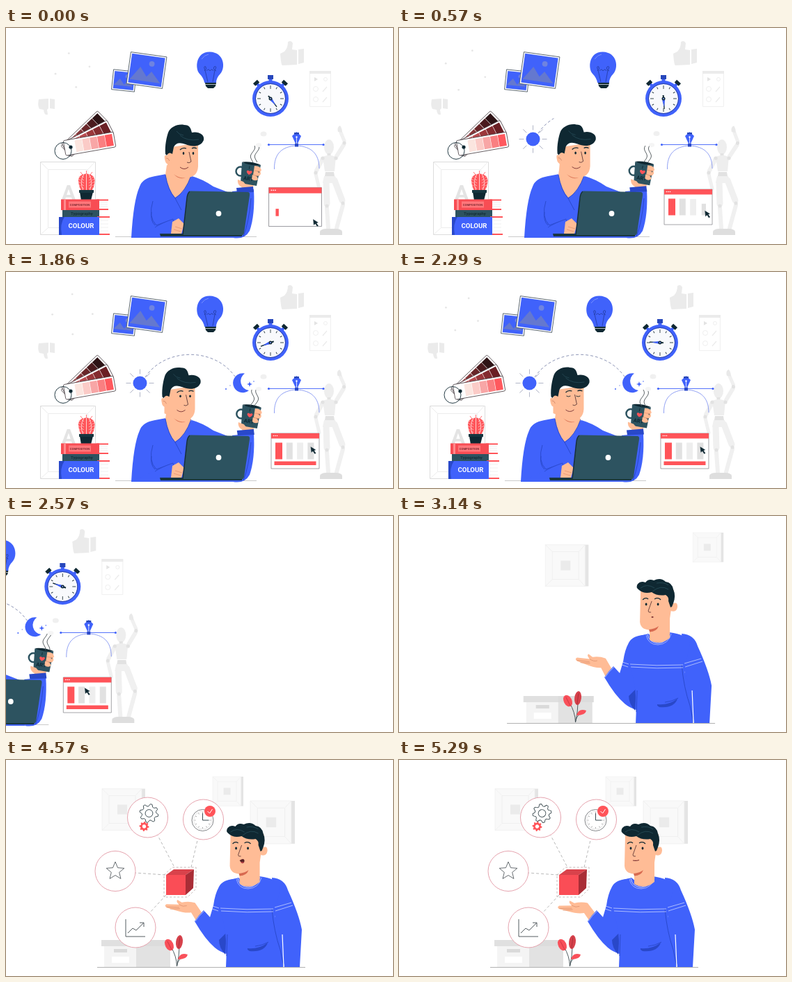
Animation of 556 by 312 pixels, one loop 5440 ms. Source, as an HTML page with a canvas:

```html
<!DOCTYPE html>
<html lang="en">
<head>
<meta charset="utf-8">
<title>Designer at work</title>
<style>
html, body { margin: 0; width: 100%; height: 100%; overflow: hidden; background: #fff; }
canvas { display: block; width: 556px; height: 312px; }
</style>
</head>
<body>
<canvas id="stage"></canvas>
<script>
const canvas = document.getElementById('stage');
const c = canvas.getContext('2d');
const ratio = window.devicePixelRatio || 1;
canvas.width = 556 * ratio;
canvas.height = 312 * ratio;

const LOOP = 5440, STEP = LOOP / 38;
const BLUE = '#4062fb', NAVY = '#2948c9', DARK = '#0f2832', TEAL = '#2d5360',
      RED = '#ff5459', SKIN = '#ffbc96', PALE = '#ebebeb', INK = '#3b4a50';
const TAU = Math.PI * 2;
const rad = deg => deg * Math.PI / 180;
const clamp = x => Math.max(0, Math.min(1, x));
const prog = (t, start, len) => clamp((t - start) / len);
const out = p => 1 - (1 - p) * (1 - p);
const mix = (a, b, p) => a + (b - a) * p;

function fill(d, color) { c.fillStyle = color; c.fill(new Path2D(d)); }
function line(d, color, w = 1) { c.strokeStyle = color; c.lineWidth = w; c.stroke(new Path2D(d)); }
function box(x, y, w, h, color) { c.fillStyle = color; c.fillRect(x, y, w, h); }
function frame(x, y, w, h, color, lw = 1) { c.strokeStyle = color; c.lineWidth = lw; c.strokeRect(x, y, w, h); }
function oval(x, y, rx, ry, color) {
  c.fillStyle = color; c.beginPath(); c.ellipse(x, y, rx, ry, 0, 0, TAU); c.fill();
}
const disc = (x, y, r, color) => oval(x, y, r, r, color);
function ring(x, y, r, color, w = 1) {
  c.strokeStyle = color; c.lineWidth = w; c.beginPath(); c.arc(x, y, r, 0, TAU); c.stroke();
}
function at(x, y, deg, scale, draw) {
  if (scale <= 0) return;
  c.save(); c.translate(x, y); c.rotate(rad(deg)); c.scale(scale, scale); draw(); c.restore();
}
const shift = (x, y, draw) => at(x, y, 0, 1, draw);
function text(s, x, y, size, color) {
  c.font = `bold ${size}px Roboto, sans-serif`;
  c.textAlign = 'center'; c.textBaseline = 'middle';
  c.fillStyle = color; c.fillText(s, x, y);
}

// ---------- desk scene ----------

function floatingSquare(t) {
  const r = 25 + 7 * Math.sin(Math.PI * clamp(t / 2290)), turn = rad(-102 + t * 0.0545);
  for (let i = 0; i < 4; i++) {
    const a = turn + i * TAU / 4;
    disc(95.5 + r * Math.cos(a), 61 + r * Math.sin(a), 1.4, '#e6e6e6');
  }
}

function thumbs() {
  fill('M394 37L400 34Q405 29 405 20Q410 17 412 22L411 31L418 32V53L397 54Q395 53 394 37Z', PALE);
  fill('M420 31L428 30V50L420 52Z', PALE);
  fill('M47 103L61 102V116L59 118L60 125Q55 127 54 118L48 117Q45 112 47 103Z', PALE);
  fill('M63 102L70 103V117L63 116Z', PALE);
}

function card() {
  frame(436.5, 62.5, 30, 51, '#ededed', 0.8);
  box(436, 62, 31, 4, PALE);
  fill('M443 71L448 74L443 77Z', '#e3e3e3');
  ring(459, 74, 2.5, PALE, 0.8);
  ring(445, 88, 3.5, PALE, 0.8);
  line('M455 92L461 85', PALE, 1.2);
  ring(445, 103, 3.5, PALE, 0.8);
  line('M455 107L461 100', PALE, 1.2);
}

function photo(x, y, deg, w, h) {
  at(x, y, deg, 1, () => {
    box(-w / 2, -h / 2, w, h, '#fff');
    frame(-w / 2, -h / 2, w, h, '#53606b', 0.9);
    box(-w / 2 + 2, -h / 2 + 2, w - 4, h - 4, BLUE);
    const b = h / 2 - 7;
    fill(`M${-w * .43} ${b}L${-w * .18} ${-h * .08}L${w * .02} ${h * .2}L${w * .14} ${h * .02}L${w * .42} ${b}Z`, '#6478cf');
    disc(w * .12, -h * .22, w * .075, '#6f83e0');
  });
}

function bulb() {
  fill('M285 79Q284 72 278 66C271 58 273 34 293 34.5C313 35 316 57 308 66Q302 72 302 79Z', BLUE);
  line('M290 78L286 61Q283 54 287 56Q289 60 285 62M297 78L300 61Q304 54 299 56Q297 60 302 62M288 62Q291 58 293 62Q296 58 298 62', '#223a9e', 0.8);
  line('M281 45Q285 39 291 38', '#7990ff', 1);
  fill('M286 79H302L301 84L298 87H290L287 84Z', DARK);
  line('M286.5 81.5H301.5', '#fff', 0.7);
}

function stopwatch(t) {
  shift(380, 102, () => {
    for (const a of [-42, 42]) at(0, 0, a, 1, () => { box(-2, -29, 4, 5, BLUE); box(-4, -33, 8, 5, DARK); });
    box(-2.5, -29, 5, 5, BLUE);
    box(-4, -34, 8, 6, '#2747bb');
    disc(0, 0, 26, BLUE);
    disc(0, 0, 21, '#f8f9fc');
    ring(0, 0, 21.5, '#263b91', 0.8);
    for (let i = 0; i < 12; i++)
      at(0, 0, i * 30, 1, () => box(-0.5, -19, 1, i % 3 ? 3 : 5, INK));
    at(0, 0, 53 + t * 0.057, 1, () => {
      fill('M-5 -1L15 -.6V.6L-5 1Z', DARK);
      fill('M2 -2L12 0L2 2Z', BLUE);
    });
    disc(0, 0, 2.5, DARK);
    disc(0, 0, 1, '#8ba0ff');
  });
}

function swatches() {
  const fans = [
    [-44, ['#a5484c', '#863638', '#692629', '#4a1a1d', '#2d1315']],
    [-27, ['#d3686b', '#b84c50', '#9c373b', '#842b2f', '#6a1f24']],
    [-10, ['#fbe5df', '#fbcbc7', '#f8a6a6', '#fa7f81', '#ff595e']]
  ];
  for (const [deg, tones] of fans) at(93, 172, deg, 1, () => {
    c.fillStyle = '#fff'; c.beginPath(); c.roundRect(-9, -11, 73, 22, 2); c.fill();
    c.strokeStyle = '#4c4348'; c.lineWidth = 0.8; c.stroke();
    tones.forEach((tone, i) => box(7 + i * 11, -8.5, 10.4, 17, tone));
  });
  disc(93, 172, 2.6, DARK);
  ring(82, 177.5, 12, DARK, 0.9);
}

function books() {
  box(49.5, 193.5, 79, 105, '#fff');
  frame(49.5, 193.5, 79, 105, '#dcdcdc');
  frame(60.5, 204.5, 57, 84, '#e8e8e8', 0.8);
  line('M49 193L60 204M128 193L118 204M49 299L60 289', '#e8e8e8', 0.8);
  text('A', 90, 240, 31, '#e4e4e4');

  fill('M104 221C103 207 128 207 127.5 221Q127 231 122 236H109Q105 231 104 221Z', RED);
  line('M115.5 210V235M112 211Q105 222 111 235M119 211Q126 222 120 235', '#fff0ed', 0.8);
  for (let y = 214; y < 234; y += 4)
    line(`M104 ${y}L107 ${y + 2}M109 ${y}L112 ${y + 2}M122 ${y}L119 ${y + 2}M127 ${y}L124 ${y + 2}`, '#ffd9d5', 0.7);
  line('M115.5 211V206M110 212L107 208M121 212L124 208', RED, 0.8);
  fill('M106 237H125L122 249H108Z', DARK);
  box(105, 234, 21, 4, '#173640');

  box(132, 248, 15, 15, '#fff');
  line('M130 248.5H147M130 262H147', RED, 1.8);
  line('M134 252H146M134 255H146M134 258H146', '#e4e4e4', 0.6);
  box(79, 247.5, 55, 15.5, '#f84d54');
  box(83, 247.5, 3, 15.5, '#ff8b8d');
  box(90, 250.5, 32, 9, '#ff777b');
  text('COMPOSITION', 106, 255.5, 4.2, '#812b33');
  box(81, 263, 53, 10, TEAL);
  text('Typography', 109, 268.3, 6, '#14303a');
  box(132, 273, 16, 25, '#fff');
  line('M131 273H149M131 298H149', RED, 1.8);
  line('M135 278H147M135 283H147M135 288H147M135 293H147', '#e7e7e7', 0.6);
  box(76, 273, 58, 26, BLUE);
  fill('M76 273H84Q77 283 80 299H76Z', NAVY);
  text('COLOUR', 108, 286.5, 9.6, '#fff');
}

function mannequin(t) {
  const limb = (d, w) => line(d, '#f0f0f0', w), joint = (x, y, r = 2.6) => disc(x, y, r, '#e2e2e2');
  c.lineCap = 'round';
  limb('M455 189L446 206', 6); limb('M445 211L450 232', 5);
  limb('M460 222L461 254', 9); limb('M461 260L463 289', 6);
  limb('M472 220L483 249', 9); limb('M484 256L475 289', 6);
  at(474, 187, Math.sin(t / 500) * 1.5, 1, () => {
    limb('M1 -2L11 -18', 6); limb('M12 -24L7 -36', 5);
    fill('M3 -37Q1 -44 6 -46Q9 -42 9 -36Z', '#e9e9e9');
    joint(12, -21);
  });
  c.lineCap = 'butt';
  oval(464, 172, 7, 11, '#eeeeee');
  box(461.5, 181, 5, 5, '#e3e3e3');
  fill('M455 186Q464 182 474 186L472 207H458Z', '#eeeeee');
  fill('M459 208H471L472 214H458Z', '#e2e2e2');
  fill('M457 214H473L476 224H455Z', '#f0f0f0');
  joint(455, 188); joint(445, 209); joint(474, 188); joint(461, 257); joint(484, 253);
  fill('M451 299V294Q453 290 460 290H474Q481 290 483 294V299Z', '#dedede');
}

function penTool() {
  line('M378 168.500H456', BLUE, 0.9);
  disc(377.5, 168.5, 1.6, BLUE); disc(456, 168.5, 1.6, BLUE);
  line('M385.5 204C385 181 397 171 417.5 170C438 171 450 181 450 203', '#7488f0', 0.8);
  fill('M417.5 150L424 156L419.5 166H415.5L411 156Z', BLUE);
  box(414, 151, 7, 2.5, '#2846b7');
  line('M417.5 158V167', '#fff', 0.8);
  disc(417.5, 157.5, 1.2, '#fff');
  box(415, 166.5, 5, 5, NAVY);
}

function browser(t) {
  const size = 1 + 0.1 * (1 - prog(t, 0, 500));
  at(415.5, 258.5, 0, size, () => {
    box(-34.5, -25.5, 69, 51, '#fff');
    frame(-34.5, -25.5, 69, 51, '#8d8d92', 0.8);
    box(-34.5, -25.5, 69, 7.5, RED);
    for (const x of [-31, -28.5, -26]) disc(x, -22, 0.8, '#fff');
    for (let i = 0; i < 4; i++) {
      const p = out(prog(t, -130 + i * 170, 430)), grow = i ? p : 0.4 + 0.6 * prog(t, 0, 380);
      const h = 24 * grow, w = (i ? 9 : 10) * grow;
      if (p) box(-23.5 + i * 15.3 - w / 2, 12 - h, w, h, i ? (i == 2 ? '#eeeeee' : '#e1e1e1') : RED);
    }
    box(-30, 15, 60 * out(prog(t, 640, 430)), 5.5, RED);
  });
  const p = prog(t, 100, 900), q = prog(t, 2290, 286);
  shift(mix(441, 437.5, p) - 26 * q, mix(276, 252, p) - 4 * q, () => {
    const arrow = 'M0 0L1 9L3.4 7L6 11L8 9.7L5.4 6L8 5Z';
    fill(arrow, DARK);
    line(arrow, '#fff', 0.3);
  });
}

function dayNight(t) {
  const sun = out(prog(t, 250, 300)), arc = prog(t, 450, 550), moon = out(prog(t, 850, 300));
  if (arc) {
    c.save();
    c.beginPath(); c.rect(190, 110, 145 * arc, 60); c.clip();
    c.setLineDash([4, 3]);
    line('M200 152C228 109 299 108 329 151', '#7f88ad', 0.9);
    c.restore();
  }
  at(192.5, 160.5, 0, sun, () => {
    disc(0, 0, 10, BLUE);
    for (let i = 0; i < 8; i++) at(0, 0, i * 45, 1, () => line('M13 0H20', '#a9aec2', 0.9));
  });
  at(338, 161, 0, moon, () => {
    fill('M5 -14.5A14 14 0 1 0 11 10A13.5 13.5 0 0 1 5 -14.5Z', BLUE);
    fill('M12 -3L13 0L16 1L13 2L12 5L11 2L8 1L11 0Z', BLUE);
    disc(-22, 8, 1, BLUE); disc(-16, 3, 0.8, '#8796e8'); disc(18, -3, 0.8, BLUE);
  });
}

function mugArm(t) {
  const p = clamp(t / 2290);
  fill('M325 236L356 233Q358 270 350 293Q343 306 326 303Z', BLUE);
  line('M352 246Q349 281 341 301', NAVY, 1);
  shift(p, -2.5 * p, () => {
    fill('M335 221L341 237L354 235L357 220L366 211L365 203L356 196L344 224Z', SKIN);
    fill('M331 231L355 229L356 237L332 238Z', NAVY);
    ring(337, 207, 6.5, TEAL, 2.5);
    fill('M339 194L366 198L360 228L337 224Z', TEAL);
    fill('M339 193.5Q352 192 366 197.5Q352 200 339 193.5Z', DARK);
    at(349, 212, 9, 1, () => {
      text('I', -1, -10, 6, '#0e2833');
      fill('M0 0C-7 -4 -3 -8 0 -5C3 -8 7 -4 0 0Z', RED);
      text('ART', 0, 6, 7.5, '#0e2833');
    });
    fill('M357 199Q366 199 367 206Q361 209 356 206Z', SKIN);
    fill('M356 206Q364 206 365 213Q359 215 355 212Z', SKIN);
    fill('M354 212Q362 213 362 219Q357 222 353 218Z', SKIN);
    fill('M333 219Q332 225 337 229L346 228L341 222Z', SKIN);
    line('M357 206L364 207M355 212L362 214', '#df8d6b', 0.6);
  });
  for (const x of [353, 359]) {
    c.beginPath();
    for (let y = 194; y >= 170; y -= 1)
      c.lineTo(x + 2.5 * Math.sin((y + t * 0.02) / 3.8) + (194 - y) * 0.1, y);
    c.strokeStyle = '#4d5559'; c.lineWidth = 0.9; c.stroke();
  }
  oval(370, 153 - 2 * p, 4.5, 3.5, '#f0f0f0');
  oval(363, 169, 4, 3, '#f5f5f5');
}

function deskHead(t) {
  const p = clamp(t / 2290), blink = t > 2250 && t < 2420;
  shift(-5.5 * p, -2 * p, () => {
    fill('M232 173L276 166L276 200Q275 216 259 216Q250 217 244 211L232 206Z', SKIN);
    fill('M238 188Q226 179 228 189Q229 199 237 196Z', SKIN);
    fill('M229 182C228 169 231 157 233 151C236 143 247 138 256 140C264 140 265 144 267 151C275 149 286 153 284 162C280 172 267 172 258 168Q245 163 241 172L239 182Q234 178 231 184Z', DARK);
    line('M250 155Q260 164 277 161M245 149Q248 154 255 155', '#274c58', 0.8);
    line('M250 176Q254 172 259 174M267 174Q270 172 274 174', DARK, 1.3);
    if (blink) line('M251 181Q254 183 257 181M265 181Q268 183 271 181', DARK, 0.9);
    else { oval(255, 181, 1.3, 1.9, DARK); oval(269, 181, 1.3, 1.9, DARK); }
    line('M263 179L266 193Q263 196 260 194', '#5b3838', 0.9);
    line('M250 201Q256 206 262 201', '#823c3b', 1);
    line('M230 188Q233 187 235 192', '#c97f62', 0.7);
  });
}

function worker(t) {
  line('M157 301.500H360', '#bdbdbd', 0.8);
  fill('M180 303Q183 249 192 229Q196 217 214 214L230 211L242 231L267 214Q282 218 298 229L326 240V303Z', BLUE);
  fill('M231 198L264 208L266 213Q257 238 243 245Q233 234 229 212Z', SKIN);
  fill('M241 211Q249 218 258 216Q249 220 241 211Z', '#dc7959');
  line('M229 212Q233 235 243 246Q258 236 266 213', NAVY, 0.9);
  line('M243 246L252 263M211 250Q204 273 216 285L240 276M209 266Q207 278 214 285', NAVY, 0.9);
  fill('M216 286L240 275L246 294L222 302H180L190 298Z', BLUE);
  line('M214 288Q223 282 240 276L244 294', NAVY, 0.8);
  mugArm(t);
  deskHead(t);
  fill('M239 280L248 275L256 283L252 297H237Z', SKIN);
  line('M243 287L253 290M241 291L251 294', '#d78666', 0.6);
  fill('M265 235.5L347 237Q351 237 350 242L342 296Q341 300 337 300H254L261 240Q262 236 265 235.5Z', TEAL);
  line('M264 236Q261 238 260 245L254 299', '#172f38', 1.5);
  fill('M221 297H254L256 301H222Z', '#183640');
  box(240, 299, 99, 2, '#183640');
  disc(305.5, 268, 3.9, '#fff');
}

function deskScene(t) {
  floatingSquare(t);
  thumbs();
  card();
  photo(169.5, 76, 6, 33, 29);
  photo(202, 61, 8, 52, 46);
  bulb();
  stopwatch(t);
  books();
  swatches();
  mannequin(t);
  penTool();
  browser(t);
  dayNight(t);
  worker(t);
}

// ---------- idea scene ----------

function wallFrame(x, y, s) {
  at(x, y, 0, s / 62, () => {
    box(0, 0, 57, 60, '#f9f9f9');
    box(57, 0, 5, 60, '#e4e4e4');
    frame(0, 0, 57, 60, '#f0f0f0', 0.8);
    frame(10, 10, 38, 40, '#eeeeee', 0.8);
    line('M0 0L10 10M57 0L48 10M0 60L10 50M57 60L48 50', '#eeeeee', 0.8);
    box(22, 23, 14, 14, '#ebebeb');
  });
}

function crate() {
  box(141, 268, 47, 31, '#f4f4f4');
  box(187, 268, 49, 31, '#e2e2e2');
  box(137, 260, 51, 9, '#e0e0e0');
  box(187, 260, 51, 9, '#dcdcdc');
  box(155, 273, 19, 5, '#dadada');
  box(152, 284, 25, 9, '#fff');
}

function plant() {
  line('M245.5 298Q245 283 237 270M245.5 298Q249 282 249 270M245.5 297Q247 289 252 286', INK, 0.9);
  at(234.5, 267, -27, 1, () => { oval(0, 0, 5.8, 8.8, '#f9505a'); line('M0 -6V8', '#b62e39', 0.6); });
  at(249, 263, 7, 1, () => { oval(0, 0, 4.9, 10, '#d6414b'); line('M0 -7V9', '#962630', 0.6); });
  fill('M247 288Q250 277 261 281Q260 288 247 288Z', '#f9505a');
}

function talkHead(t) {
  const dx = t < 4000 ? mix(2, 0, prog(t, 3150, 850)) : 4 * prog(t, 4150, 1100);
  const talk = t > 3650 && t < 4900 && Math.floor((t - 3650) / STEP) % 4 != 1;
  shift(dx, 0, () => {
    fill('M321 108L369 107L363 148V176Q349 188 334 179V164.500Q321 164 320 153Z', SKIN);
    fill('M333 164Q342 163 347 159Q344 167 334 167.500Z', '#d86a50');
    fill('M365 128Q374 122 374 131Q373 140 364 137Z', SKIN);
    fill('M364 132L361 123Q362 117 357 114Q345 116 337 110Q326 113 319 107Q313 103 317 98Q321 93 328 96Q332 90 340 93Q350 88 357 95Q366 96 368 106Q372 115 368 126L366 131Z', DARK);
    line('M321 104Q330 97 341 104M338 109Q350 99 361 106M344 97Q354 95 361 100', '#294e5a', 0.8);
    line('M324 121Q328 117 332 120M341 120Q346 117 350 121', DARK, 1.2);
    oval(329, 127.5, 1.4, 1.9, DARK); oval(346, 127.5, 1.4, 1.9, DARK);
    line('M337 123L332 137Q332 140 336 139', '#623c38', 0.9);
    if (talk) {
      fill('M334 145Q340 141 341 145Q341 150 337 149Z', '#5a2226');
      line('M336 148H340', RED, 1);
    } else if (t < 3650) oval(338, 146, 1.6, 1.1, '#7c3131');
    else line('M332 145Q336 146 341 144.500', '#7c3131', 1.1);
  });
}

function speaker(t) {
  const lift = t < 4000 ? mix(3, 0, prog(t, 3150, 850)) : -4 * prog(t, 4150, 1100);
  at(279, 222, lift, 1, () => shift(-279, -222, () => {
    fill('M281 220L272 206Q263 203 253 205L247 201Q244 203 249 208L231 207Q227 209 231 212L243 216Q257 221 266 220L273 232Z', SKIN);
    line('M231 211L249 212M236 214L250 214M249 208Q255 212 260 210', '#d98b69', 0.7);
  }));
  fill('M334 171Q311 172 306 183Q300 194 298 210L293 227L284 217Q277 224 271 233Q286 259 300 271Q307 277 317 280L324 230Z', BLUE);
  fill('M317 249L306 260Q306 271 315 281Z', NAVY);
  line('M285 218Q277 225 272 233', '#b9c8ff', 0.8);
  fill('M382 170Q400 171 405 188Q421 223 425 245L422 299H400L385 219Z', BLUE);
  fill('M334 170L313 176Q306 191 307 218Q319 244 316 299H398Q401 260 386 225L394 184Q391 171 364 168Q350 185 334 170Z', BLUE);
  line('M382 215Q385 248 394 274L399 299', NAVY, 0.9);
  line('M397 252L399 299', '#fff', 1.2);
  line('M333 171Q335 183 348 184Q361 183 365 169', '#dce3ff', 0.8);
  line('M331 172Q334 186 348 186Q363 185 367 170', '#dce3ff', 0.6);
  line('M308 214Q346 217 384 215M309 218Q346 221 384 219M297 211L306 214M296 215L305 218M386 213L410 206M387 218L412 210', '#c7d2ff', 0.8);
  fill('M347 272Q362 274 376 264Q371 278 350 276Q346 274 347 272Z', NAVY);
  line('M358 269Q368 268 377 263M318 252L317 283', NAVY, 0.9);
  talkHead(t);
}

function gear(x, y, r, teeth, deg, solid) {
  at(x, y, deg, 1, () => {
    c.beginPath();
    for (let i = 0; i < teeth * 4; i++) {
      const a = (i + 0.5) * TAU / (teeth * 4), d = i % 4 < 2 ? r : r * 0.76;
      c.lineTo(d * Math.cos(a), d * Math.sin(a));
    }
    c.closePath();
    if (solid) { c.fillStyle = RED; c.fill(); disc(0, 0, r * 0.38, '#fff'); }
    else { c.strokeStyle = INK; c.lineWidth = 0.9; c.stroke(); ring(0, 0, r * 0.4, INK, 0.9); }
  });
}

// Icons are drawn around the middle of their bubble.
function gearIcon(t) {
  gear(2, -6, 13.5, 8, t * 0.03, false);
  gear(-5, 13, 7, 8, -t * 0.06, true);
}
function clockIcon() {
  ring(-1, 1, 15.5, '#74777a', 0.9);
  ring(-1, 1, 13, '#d2d2d2', 0.6);
  for (let i = 0; i < 12; i++) at(-1, 1, i * 30, 1, () => box(-0.3, -12, 0.6, 2, '#777'));
  line('M-1 -9V1H8', INK, 1);
  disc(9.5, -12, 8, RED);
  line('M6 -12L9 -9L13 -15', '#fff', 1);
}
function starIcon() {
  c.beginPath();
  for (let i = 0; i < 10; i++) {
    const a = -TAU / 4 + i * TAU / 10, r = i % 2 ? 6 : 13.5;
    c.lineTo(r * Math.cos(a), r * Math.sin(a));
  }
  c.closePath(); c.strokeStyle = '#555c60'; c.lineWidth = 0.9; c.stroke();
}
function chartIcon() {
  line('M-14 -12V13H14', '#555c60', 1);
  line('M-11 8L-4 1L1 4L12 -7M6 -7H12V-1', '#555c60', 1);
}

const bubbles = [
  { x: 203.5, y: 83, from: [241, 153], to: [218, 109], start: 3720, icon: gearIcon },
  { x: 283.5, y: 86, from: [266, 155], to: [275, 116], start: 3960, icon: clockIcon },
  { x: 157, y: 160.5, from: [229, 166], to: [186, 163], start: 4080, icon: starIcon },
  { x: 186, y: 242, from: [230, 195], to: [207, 220], start: 4250, icon: chartIcon }
];

function bubble(b, t) {
  const [fx, fy] = b.from, [ex, ey] = b.to;
  const p = out(prog(t, b.start - 230, 220)), s = out(prog(t, b.start, 210));
  if (p) {
    c.setLineDash([4, 3]);
    line(`M${fx} ${fy}L${mix(fx, ex, p)} ${mix(fy, ey, p)}`, '#b2b2b2', 0.9);
    c.setLineDash([]);
  }
  at(mix(ex, b.x, s), mix(ey, b.y, s), 0, s, () => {
    disc(0, 0, 29, '#fff');
    ring(0, 0, 29, '#e6a3ae', 1);
    b.icon(t);
  });
}

function cube(t) {
  const s = out(prog(t, 3330, 230));
  at(250, 177, 0, s, () => shift(-250, -177, () => {
    fill('M230 166L241 158H270L258 166Z', '#d9424b');
    fill('M258 166L270 158L269 185L258 195Z', '#a92d36');
    fill('M230 166H258V195H230Z', '#fa4d56');
    c.setLineDash([3, 2.5]);
    line('M227 166L239 155H273V186L261 198H227Z', '#b8aaaa', 0.8);
    c.setLineDash([]);
  }));
}

function ideaScene(t) {
  const slide = lag => 24 * Math.pow(3, lag - (t - 3150) / STEP);
  const glide = (lag, draw) => shift(slide(lag), 0, draw);
  glide(1, () => wallFrame(138, 41.5, 62));
  glide(1.5, () => wallFrame(297, 24, 44));
  glide(2.5, () => wallFrame(351, 59, 64));
  glide(0.5, crate);
  glide(-1, plant);
  glide(0, () => {
    speaker(t);
    line('M131 299.500H430', '#a9a9a9', 0.9);
  });
  cube(t);
  bubbles.forEach(b => bubble(b, t));
}

// The picture advances in even steps; the small lead absorbs rounded clock times.
function render(ms) {
  const t = Math.floor((ms % LOOP + 14) / STEP) % 38 * STEP;
  c.setTransform(ratio, 0, 0, ratio, 0, 0);
  box(0, 0, 556, 312, '#fff');
  c.lineJoin = 'round';
  if (t < 2700) {
    const pan = 5 * Math.pow(7.7, (t - 2290) / STEP);
    shift(-pan, 0, () => deskScene(t));
  } else ideaScene(t);
}

let began = null;
function tick(now) {
  if (began === null) began = now;
  render(now - began);
  requestAnimationFrame(tick);
}
render(0);
requestAnimationFrame(tick);
</script>
</body>
</html>
```
